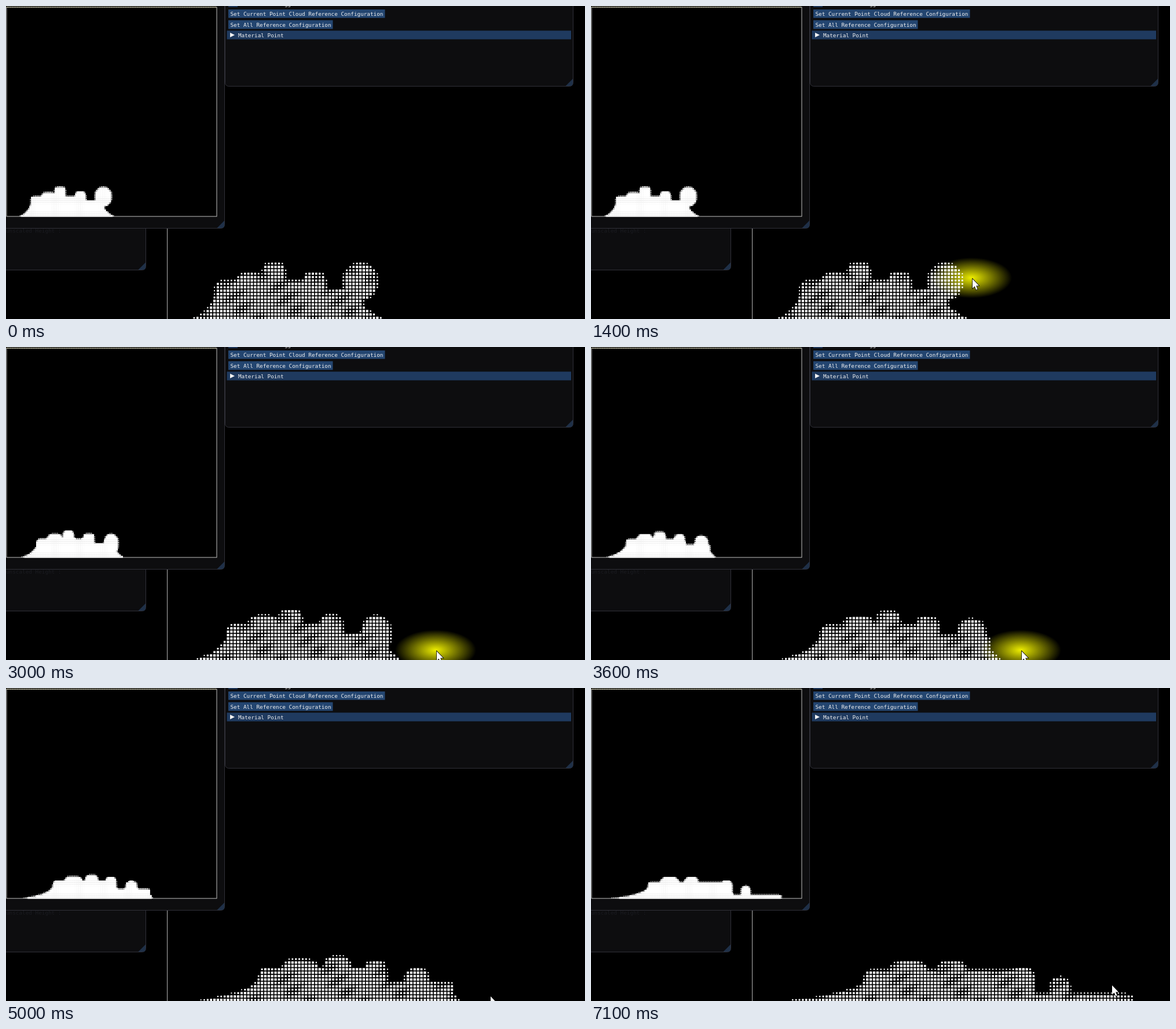
An HTML page with a canvas for the animation above (7200 ms loop, 1000 by 540 pixels).

```html
<!DOCTYPE html>
<html lang="en">
<head>
<meta charset="utf-8">
<title>Material point fluid</title>
<style>
html, body { margin: 0; width: 100%; height: 100%; overflow: hidden; background: #000; }
canvas { display: block; }
</style>
</head>
<body>
<canvas id="stage" width="1000" height="540"></canvas>
<script>
const ctx = document.getElementById('stage').getContext('2d');
const LOOP = 7200, STEP = 100, FLOW_START = 1500, FLOW_END = 7100, FLOOR = 540;

// Grid of material points; one mask pixel per point gives its coverage.
const COLS = 120, ROWS = 17, PITCH = 5.86, X0 = 278, Y0 = 444.3;
const mask = document.createElement('canvas');
mask.width = COLS;
mask.height = ROWS;
const mtx = mask.getContext('2d', { willReadFrequently: true });

// Mouse stops: time, x, y.
const mouse = [
  [600, 640, 560], [1400, 659, 471], [2300, 700, 502], [2700, 744, 525],
  [3800, 744, 525], [5000, 837, 532], [5900, 895, 538], [7100, 900, 513]
];
const drags = [[900, 1800], [2700, 3800], [5400, 6300]];

const mix = (a, b, p) => a + (b - a) * p;

function mouseAt(t) {
  let i = 0;
  while (i < mouse.length - 2 && t >= mouse[i + 1][0]) i++;
  const [a, b] = [mouse[i], mouse[i + 1]];
  const p = Math.max(0, (t - a[0]) / (b[0] - a[0]));
  return [mix(a[1], b[1], p), mix(a[2], b[2], p)];
}

// Rounded column of fluid standing on the floor.
function mound(left, right, top, bottom = FLOOR + 40, r = 0.7 * (right - left) / 2) {
  mtx.beginPath();
  mtx.roundRect(left, top, right - left, bottom - top, r);
  mtx.fill();
}

// Thin tongue running from a mound's side down to a tip on the floor.
function tongue(tip, x, y) {
  mtx.beginPath();
  mtx.moveTo(tip, FLOOR);
  mtx.quadraticCurveTo(x + Math.sign(tip - x) * 8, FLOOR - 15, x, y);
  mtx.lineTo(x, FLOOR + 20);
  mtx.lineTo(tip, FLOOR + 20);
  mtx.fill();
}

// The rear settles early while the front keeps gaining speed.
function coverage(t) {
  const u = Math.min(1, Math.max(0, (t - FLOW_START) / (FLOW_END - FLOW_START)));
  const slow = u * u * (3 - 2 * u), fast = u ** 1.5, sink = u ** 0.75;
  const lobe = (x, y, w, p) => mound(x - w, x + w, y);

  mtx.setTransform(1, 0, 0, 1, 0, 0);
  mtx.clearRect(0, 0, COLS, ROWS);
  mtx.setTransform(1 / PITCH, 0, 0, 1 / PITCH, 0.5 - X0 / PITCH, 0.5 - Y0 / PITCH);

  const left = mix(362, 472, slow), crest = mix(533, 745, fast);
  tongue(mix(323, 345, u), left + 5, mix(482, 498, slow));
  mound(left, crest + 20, mix(473, 487, sink), FLOOR + 40, 13);
  lobe(mix(423, 548, slow), mix(461, 471, slow), mix(25, 36, slow));
  lobe(mix(463, 623, slow), mix(443, 471, sink), mix(19, 25, slow));
  lobe(crest, mix(459, 482, fast), 19);

  const slab = mix(616, 933, fast), slabTop = mix(488, 528, fast);
  mound(crest + 10, slab, slabTop, FLOOR + 40, 8);
  tongue(slab + mix(34, 0, sink), slab - 3, mix(512, 530, sink));
  const ball = mix(612, 810, fast), half = mix(30, 17, sink);
  mound(ball - half, ball + half, mix(443, 499, sink), mix(507, 560, sink), half);
  return mtx.getImageData(0, 0, COLS, ROWS).data;
}

function square(x, y, s) {
  ctx.fillRect(x - s / 2, y - s / 2, s, s);
}

function eachPoint(data, draw) {
  for (let j = 0; j < ROWS; j++)
    for (let i = 0; i < COLS; i++) {
      const a = data[(j * COLS + i) * 4 + 3] / 255;
      if (a > 0.12) draw(X0 + i * PITCH, Y0 + j * PITCH, a);
    }
}

function drawFluid(data, drift) {
  ctx.fillStyle = '#fff';
  eachPoint(data, (x, y, a) => {
    const u = x - drift;
    const thin = Math.max(0, Math.sin(u * 0.1 + 2 * Math.sin(y * 0.05)) * Math.sin(y * 0.13 + u * 0.03));
    square(x, y, 1.6 + 2.6 * a - 0.9 * thin * a);
  });
}

function drawPreview(data) {
  ctx.fillStyle = '#fff';
  eachPoint(data, (x, y, a) =>
    square(1 + (x - X0) / 2, 312 + (y - Y0) / 1.87, a > 0.8 ? 3.5 : 1 + 1.6 * a));
}

function bar(x, y, w, h, color) {
  ctx.fillStyle = color;
  ctx.fillRect(x, y, w, h);
}

function label(text, x, y, color = '#f2f2f2') {
  ctx.fillStyle = color;
  ctx.fillText(text, x, y);
}

function panel(left, right, bottom) {
  ctx.beginPath();
  ctx.roundRect(left, -20, right - left, bottom + 20, 6);
  ctx.fillStyle = '#0d0d0f';
  ctx.fill();
  ctx.strokeStyle = '#303038';
  ctx.lineWidth = 1;
  ctx.stroke();
  ctx.beginPath();
  ctx.moveTo(right - 0.5, bottom - 13);
  ctx.lineTo(right - 0.5, bottom - 5);
  ctx.quadraticCurveTo(right - 0.5, bottom - 0.5, right - 5, bottom - 0.5);
  ctx.lineTo(right - 13, bottom - 0.5);
  ctx.fillStyle = '#1f3048';
  ctx.fill();
}

function drawPanels(data) {
  ctx.font = '9.33px "DejaVu Sans Mono", monospace';
  bar(278, 366, 1, 174, '#b4b4b4');

  panel(-20.5, 241.5, 455.5);
  label('unscaled Height :', 0, 391, '#1b1c21');

  panel(378.5, 979.5, 138.5);
  bar(384, 0, 16, 2, '#1d3557');
  label('gg', 481, -0.5);
  bar(384, 6, 270.5, 14.5, '#234570');
  bar(384, 24.5, 180.5, 15, '#234570');
  bar(381.5, 42.5, 594.5, 15, '#1f3a5f');
  label('Set Current Point Cloud Reference Configuration', 387.5, 17);
  label('Set All Reference Configuration', 387.5, 35.5);
  label('Material Point', 401, 53.5);
  ctx.fill(new Path2D('M387 46L395 50L387 54Z'));

  panel(-20.5, 377.5, 383.5);
  bar(0, 0, 365, 364, '#000');
  ctx.save();
  ctx.beginPath();
  ctx.rect(1, 2, 363, 362);
  ctx.clip();
  drawPreview(data);
  ctx.restore();
  ctx.strokeStyle = '#c8c8c8';
  ctx.strokeRect(1, 2, 363, 361);
  ctx.fillStyle = '#d0ca98';
  for (let x = 1; x < 364; x += 3) ctx.fillRect(x, 1.5, 2, 1);
}

function drawGlow(x, y) {
  ctx.save();
  ctx.translate(x, y);
  ctx.scale(2, 1);
  const g = ctx.createRadialGradient(0, 0, 0, 0, 0, 35);
  g.addColorStop(0, 'rgb(238,238,0)');
  g.addColorStop(1, 'rgba(238,238,0,0)');
  ctx.fillStyle = g;
  ctx.fillRect(-35, -35, 70, 70);
  ctx.restore();
}

const arrow = new Path2D('M0 0V16L3.7 12.6 6 18.5 8.6 17.4 6.2 11.6H11Z');
function drawCursor(x, y) {
  ctx.save();
  ctx.translate(x, y);
  ctx.strokeStyle = '#000';
  ctx.lineWidth = 1.5;
  ctx.stroke(arrow);
  ctx.fillStyle = '#fff';
  ctx.fill(arrow);
  ctx.restore();
}

function frame(now) {
  const t = Math.floor((now % LOOP) / STEP) * STEP;
  const data = coverage(t);
  const [mx, my] = mouseAt(t);
  bar(0, 0, 1000, 540, '#000');
  if (drags.some(([from, to]) => t >= from && t < to)) drawGlow(mx - 2, my - 2);
  drawFluid(data, Math.max(0, t - FLOW_START) * 0.025);
  drawPanels(data);
  drawCursor(mx, my);
}

const start = performance.now();
function tick() {
  frame(performance.now() - start);
  requestAnimationFrame(tick);
}
tick();
</script>
</body>
</html>
```
